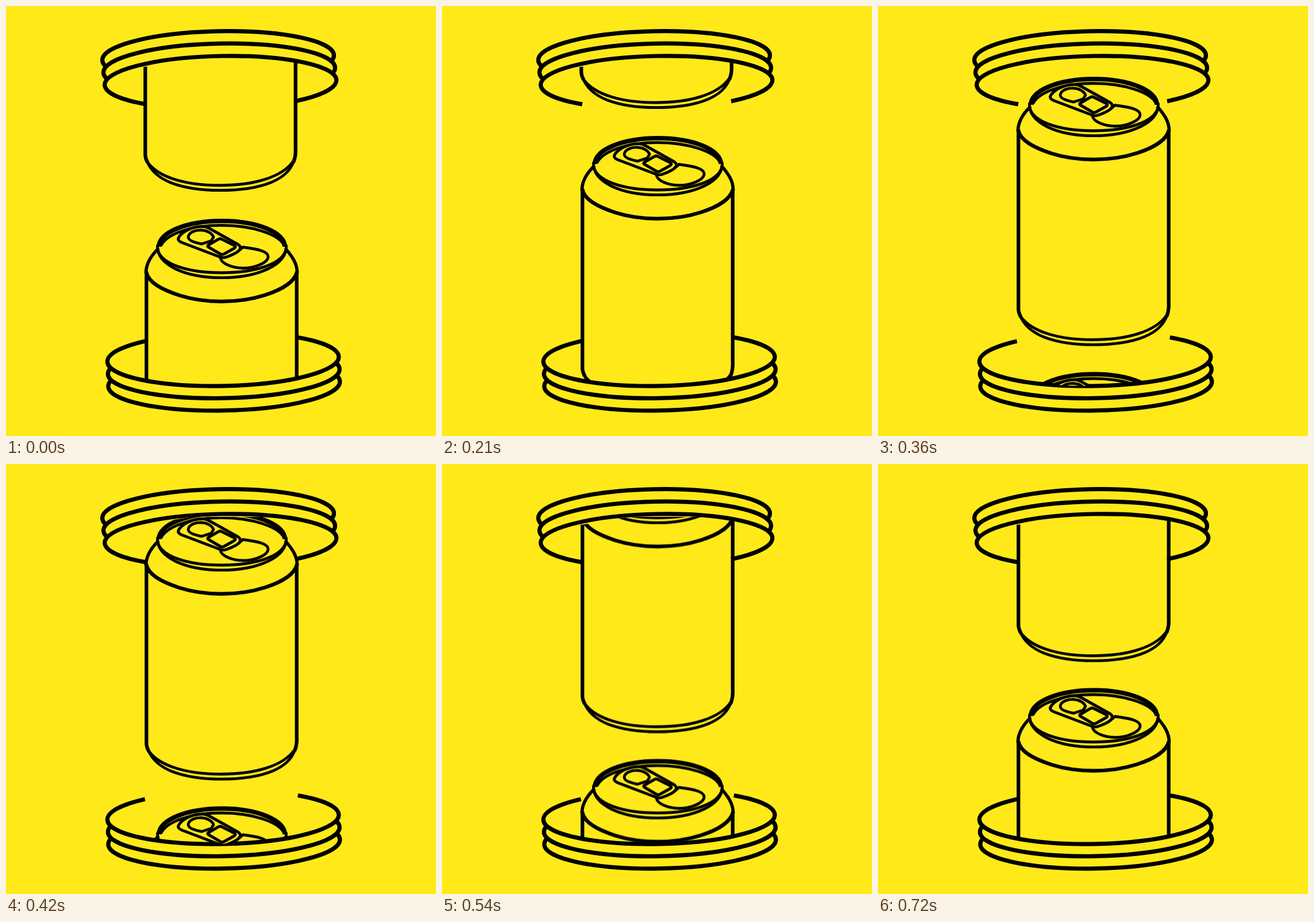
An HTML page that plays this animation: 748x748 px, repeating every 750 ms.

```html
<!DOCTYPE html>
<html lang="en">
<head>
<meta charset="utf-8">
<title>Can loop</title>
<style>
  html, body { margin: 0; width: 100%; height: 100%; overflow: hidden; background: #ffe919; }
  svg { display: block; width: 100%; height: 100%; }
  .line { fill: none; stroke: #000; stroke-linejoin: round; }
  .ring { fill: #ffe919; stroke-width: 7.2; }
  .tab { fill: #ffe919; }
  .cans { animation: rise 750ms steps(25, end) infinite; }
  @keyframes rise { to { transform: translateY(-514.5px); } }
</style>
</head>
<body>
<svg viewBox="0 0 748 748">
  <defs>
    <clipPath id="between">
      <path d="M230 107L244 105.5L270 101.5C300 95 322 92 345 92H470L520 95V645L506 648C470 657 425 661 374 661C325 661 280 658 244 652L230 649Z"/>
    </clipPath>

    <g id="can" class="line" stroke-width="4.8" stroke-linecap="round">
      <!-- body -->
      <path stroke-width="6.3" d="M244.300 464V774Q244.300 780 248 787M505.700 466V762Q506.500 776 502.500 786"/>
      <path d="M247 785C254 803 269 815 289 823C315 833 345 836.200 374 836.200C405 836.200 440 832 464 822C485 813 496 802 502.500 786"/>
      <path d="M248 787C268 815 318 827.500 374 827.500C432 827.500 482 814 502 785"/>
      <!-- shoulder -->
      <path stroke-width="5.600" d="M264 423C254 433 243.500 447 243.500 464M487 423C498 436 506.500 448 506.500 464"/>
      <path stroke-width="6.500" d="M244 463C248 481 270 493 302 503.500C326 511 350 514 375 514C400 514 425 511 450 503C482 493 502 479 506 463"/>
      <!-- rim -->
      <path d="M263.500 417C261 450 312 472.700 375 472.700S490 450 487.500 417"/>
      <path d="M264 423C268 448 314 464 375 464S482 448 487 423"/>
      <path d="M270 416C281 396 322 381.500 375 381.500S473 397 483 415"/>
      <path stroke-width="7.800" stroke-linecap="butt" d="M266 419C265 394 314 373.800 375.500 373.800S486 394 485 419"/>
      <!-- opening and tab -->
      <path d="M373 438C374 448 394 456 413 456C434 456 456 446 456 436C456 427 440 423 412 419.500C405 427 392 434 373 438Z"/>
      <path class="tab" stroke-width="5" d="M306 411.500Q298 408 300 403.500Q303 397 313 391Q327 383.500 342 383.500Q348 383.500 353 386.500L404 415Q410 419 406 424.500Q402 430 384 436.500Q378 439 372 436.500Z"/>
      <path d="M317 402C318 393 330 389.500 340 390C351 390.500 359 396 361 402L357 408.500L340 414C328 411 318 409 317 402Z"/>
      <path stroke-width="5" d="M352.500 415.500L369 406Q372 404 375 405.500L397 416.500Q401 419 397 421.500L379 431.500Q376 433 373 431.500L352.500 419.500Q349 417.500 352.500 415.500Z"/>
    </g>

    <ellipse id="ring" class="line ring" rx="201.500" ry="46.200" transform="skewY(-1.130)"/>
  </defs>

  <!-- upper portal -->
  <use href="#ring" x="369" y="90"/>
  <use href="#ring" x="371" y="111.500"/>
  <path class="line ring" transform="translate(373 133) skewY(-1.130)" d="M-129 35.300A201.500 46 0 1 1 130 35.200"/>

  <!-- lower portal -->
  <use href="#ring" x="379.400" y="657.500"/>
  <use href="#ring" x="378.800" y="636"/>
  <path class="line ring" transform="translate(377.700 614.500) skewY(-1.130)" d="M-136 -34.300A201.300 46.500 0 1 0 130 -35.500"/>

  <g clip-path="url(#between)">
    <g class="cans">
      <use href="#can" x="-2" y="-515.500"/>
      <use href="#can"/>
      <use href="#can" y="513.500"/>
    </g>
  </g>
</svg>
</body>
</html>
```
